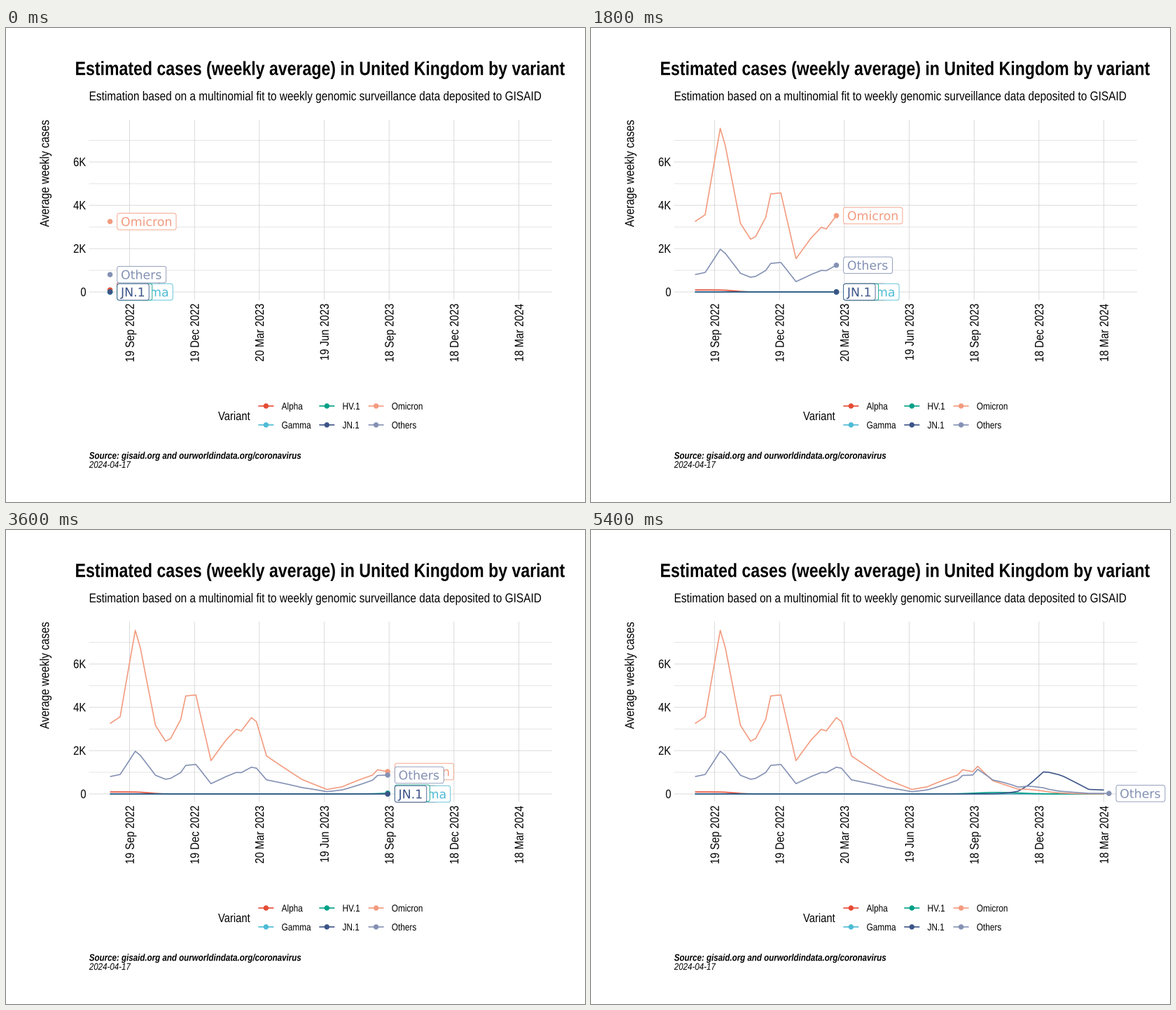
Animation, 827 px wide and 677 px high, one loop 6000 ms. Source, as a matplotlib script:

```python
import numpy as np
import matplotlib.pyplot as plt
from matplotlib.animation import FuncAnimation
from matplotlib.patches import Circle, FancyBboxPatch, PathPatch
from matplotlib.textpath import TextPath
from matplotlib.transforms import Affine2D

W, H, DPI = 827, 677, 64
PX = 72 / DPI               # one pixel in points
PT = 110 / 72               # one typographic point of the chart in pixels
CONDENSED = 0.84            # narrow cut of the sans face

STEPS = 55
X0, DX = 148.6, 7.21
Y0, DY = 377.0, 0.03096
LEFT, RIGHT, TOP, BOTTOM = 118.5, 780, 131, 388.4

COLORS = {
    "Alpha": "#E64B35", "Gamma": "#4DBBD5", "HV.1": "#00A087",
    "JN.1": "#3C5488", "Omicron": "#F39B7F", "Others": "#8491B4",
}

# Turning points of the total: (slot, cases).
WAVES = [
    (0, 4050), (2, 4460), (5, 9520), (6, 8525), (9, 4025), (11, 3113),
    (12, 3275), (14, 4425), (15, 5837), (17, 5932), (20, 2013), (23, 3295),
    (25, 3975), (26, 3890), (28, 4755), (29, 4525), (31, 2405), (38, 970),
    (43, 312), (46, 517), (52, 1505), (53, 1970), (55, 1905), (56, 2410),
    (59, 1260), (64, 663), (69, 1435), (73, 960), (78, 245), (82, 200),
]


def model(k):
    """Split the total by multinomial odds relative to Omicron."""
    total = np.interp(k, *zip(*WAVES))
    others = np.exp(-1.40 + 0.0120 * k - 1.57e-4 * k**2 + 6.29e-6 * k**3)
    jn = others * np.exp(2 - 0.0294 * (74 - np.minimum(k, 74))**2)
    unit = total / (1 + others + jn)
    return {
        "Alpha": 92 / (1 + np.exp(k - 8)),
        "Gamma": 0 * k,
        "HV.1": 72 * np.exp(-((k - 60) / 6)**2),
        "JN.1": unit * jn,
        "Omicron": unit,
        "Others": unit * others,
    }


# Reveal times fall on whole slots, so the steps alternate between one and two.
slots = np.floor(np.arange(STEPS) * 82 / 54 + 0.75)
xs = X0 + DX * slots
cases = model(slots)

fig = plt.figure(figsize=(W / DPI, H / DPI), dpi=DPI, facecolor="white")
ax = fig.add_axes([0, 0, 1, 1])
ax.set_xlim(0, W)
ax.set_ylim(H, 0)
ax.axis("off")


def y_of(count):
    return Y0 - DY * count


def stroke(x, y, color, width, z):
    line, = ax.plot(x, y, color=color, lw=width * PX, zorder=z, snap=False,
                    solid_capstyle="butt", solid_joinstyle="round")
    return line


def dot(x, y, color, z):
    return ax.add_patch(Circle((x, y), 3.75, fc=color, ec="none", zorder=z))


def at(x, y, narrow=1.0, angle=0):
    return (Affine2D().scale(narrow, -1).rotate_deg(-angle).translate(x, y)
            + ax.transData)


def glyphs(path, color, z):
    return ax.add_patch(PathPatch(path, fc=color, ec="none", lw=0, zorder=z))


def write(x, y, s, points, angle=0, anchor=0.0, weight="normal", style="normal"):
    """Condensed text; anchor 0 starts at (x, y), 1 ends there."""
    font = dict(family="Liberation Sans", weight=weight, style=style)
    path = TextPath((0, 0), s, size=points * PT, prop=font)
    shift = anchor * path.get_extents().x1
    path = path.transformed(Affine2D().translate(-shift, 0))
    glyphs(path, "black", 3).set_transform(at(x, y, CONDENSED, angle))


class Tag:
    """Rounded name label that follows the head of a line."""
    GAP, PAD, HALF = 10.2, 5.5, 11.8

    def __init__(self, name, color, z):
        path = TextPath((0, 0), name, size=17.39, prop=dict(family="DejaVu Sans"))
        width = path.get_extents().x1 + 2 * self.PAD + 1.3
        self.box = ax.add_patch(FancyBboxPatch(
            (0, 0), width, 2 * self.HALF, fc="white", ec=color, lw=0.85 * PX,
            boxstyle="round,pad=0,rounding_size=3.3", zorder=z, snap=False))
        self.text = glyphs(path, color, z + 0.05)

    def move(self, x, y):
        left = x + self.GAP
        self.box.set_x(left)
        self.box.set_y(y - self.HALF)
        self.text.set_transform(at(left + self.PAD - 0.3, y + 6.4))

    def show(self, on):
        self.box.set_visible(on)
        self.text.set_visible(on)


def draw_grid():
    for k in range(8):
        y = y_of(1000 * k)
        stroke([LEFT, RIGHT], [y, y], "#cccccc", 0.5 if k % 2 else 0.7, 1)
        if k % 2 == 0:
            write(114, y + 6, f"{k}K" if k else "0", 11.5, anchor=1)
    days = ["19 Sep 2022", "19 Dec 2022", "20 Mar 2023", "19 Jun 2023",
            "18 Sep 2023", "18 Dec 2023", "18 Mar 2024"]
    for i, day in enumerate(days):
        x = 176.5 + 92.67 * i
        stroke([x, x], [TOP, BOTTOM], "#cccccc", 0.7, 1)
        write(x + 6.3, 394.3, day, 11.5, angle=90, anchor=1)


def draw_legend():
    write(303, 560, "Variant", 11.5)
    for i, (name, color) in enumerate(COLORS.items()):
        x = (371.4, 458.3, 528.6)[i // 2]
        y = 539.9 + 27 * (i % 2)
        stroke([x - 11, x + 11], [y, y], color, 1.63, 2)
        dot(x, y, color, 3)
        write(x + 22.2, y + 5, name, 9.2)


def draw_titles():
    write(98.6, 67.2, "Estimated cases (weekly average) in United Kingdom by variant",
          18, weight="bold")
    write(118.6, 103.3, "Estimation based on a multinomial fit to weekly genomic "
          "surveillance data deposited to GISAID", 12)
    write(61.3, 131.8, "Average weekly cases", 12, angle=90, anchor=1)
    write(118.8, 615.3, "Source: gisaid.org and ourworldindata.org/coronavirus",
          9, weight="bold", style="italic")
    write(118.8, 628.2, "2024-04-17", 9, style="italic")


draw_grid()
draw_legend()
draw_titles()

tracks = []
for i, (name, color) in enumerate(COLORS.items()):
    # Only the last group reaches the final week.
    length = STEPS if name == "Others" else STEPS - 1
    tracks.append((
        y_of(cases[name][:length]),
        stroke([], [], color, 1.63, 4 + 0.1 * i),
        dot(X0, Y0, color, 5 + 0.1 * i),
        Tag(name, color, 6 + 0.1 * i),
    ))


def update(frame):
    n = min(frame, STEPS - 1)
    for ys, line, head, tag in tracks:
        alive = n < len(ys)
        end = min(n + 1, len(ys))
        line.set_data(xs[:end], ys[:end])
        head.set_visible(alive)
        tag.show(alive)
        if alive:
            head.center = xs[n], ys[n]
            tag.move(xs[n], ys[n])
    return []


anim = FuncAnimation(fig, update, frames=60, interval=100, repeat=True,
                     repeat_delay=0, init_func=lambda: update(0), blit=False)
plt.show()
```
